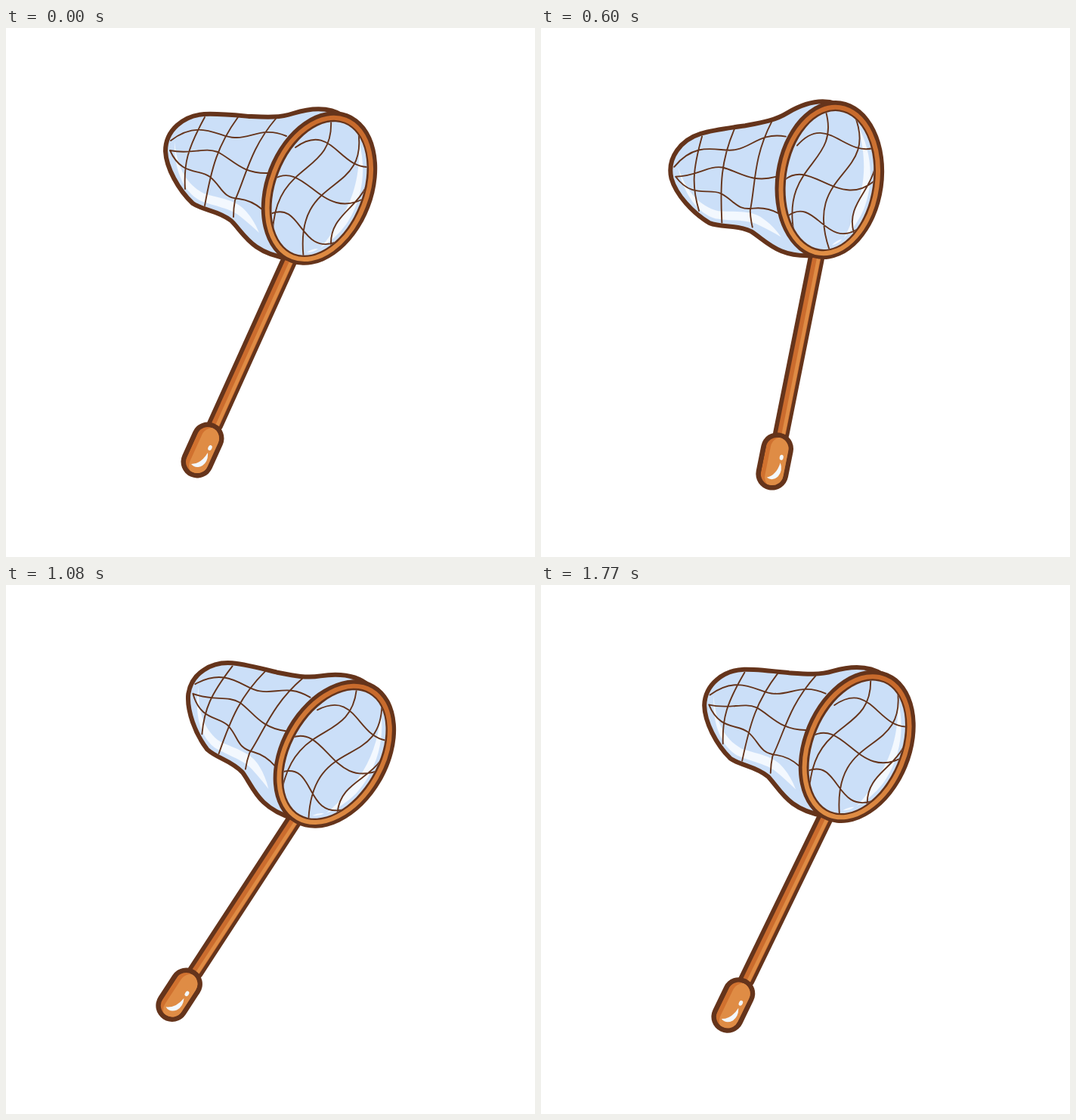
An HTML page that plays this animation: 700 px wide and 700 px high, repeating every 1800 ms.

```html
<!DOCTYPE html>
<html lang="en">
<head>
<meta charset="utf-8">
<title>Butterfly net</title>
<style>
  html, body { margin: 0; height: 100%; overflow: hidden; background: #fff; }
  svg { display: block; width: 100vw; height: 100vh; }
  .line { fill: none; stroke: #65341b; stroke-linecap: round; stroke-linejoin: round; }
  .mesh { stroke-width: 1.9; }
  .shine { fill: #f3f8fe; }
</style>
</head>
<body>
<svg viewBox="0 0 700 700">
  <defs>
    <linearGradient id="wood" x1="0" y1="0" x2="0" y2="1">
      <stop offset="0" stop-color="#c86a2c"/>
      <stop offset="1" stop-color="#e08e45"/>
    </linearGradient>
    <clipPath id="grip"><rect x="-15" y="-32" width="30" height="64" rx="15"/></clipPath>
    <clipPath id="mouth">
      <ellipse rx="57.5" ry="92" transform="translate(414.5 212.5) rotate(21)"/>
    </clipPath>
  </defs>
  <g id="net">
    <!-- pole -->
    <g transform="translate(374.5 308) rotate(24.3)">
      <path class="line" stroke-width="21.5" d="M0 0V238"/>
      <path stroke="#cb6c2e" stroke-width="11" d="M.5 0V238"/>
      <path stroke="#df8c45" stroke-width="4.5" d="M3 0V238"/>
    </g>

    <!-- bag -->
    <path class="line" stroke-width="6" style="fill:#cbdff8" d="M446 116C424 102 396 108 380 113C362 119 345 118 322 117C300 115 280 113 262 114C235 116 211 135 211 163C212 185 228 214 247 232C262 242 280 241 298 255C315 272 325 298 374 305"/>
    <path class="shine" d="M223 150C226 185 240 208 262 219C285 226 305 227 318 243Q328 254 335 271Q322 259 312 251C298 238 275 236 256 228C235 216 222 188 223 150Z"/>
    <path class="line mesh" d="M218 149C258 118 284 147 304 145C325 146 340 130 371 143
      M217 162C245 168 262 157 280 164C300 174 312 193 346 192
      M217 162C232 196 256 186 270 197C286 210 285 224 308 226Q325 228 339 240
      M263 118C240 160 235 180 237 213
      M307 118C280 155 272 185 263 235
      M357 120C323 160 318 195 303 228Q301 238 301 250"/>

    <!-- hoop -->
    <g transform="translate(414.5 212) rotate(21)">
      <ellipse rx="71.5" ry="105.5" fill="#65341b"/>
      <ellipse cy=".5" rx="63.3" ry="97.3" fill="none" stroke="url(#wood)" stroke-width="6"/>
    </g>
    <g clip-path="url(#mouth)">
      <path fill="#cbdff8" d="M330 100h170v220h-170z"/>
      <path class="shine" d="M467 150C477 185 473 226 450 260Q436 279 416 291Q430 275 438 260C460 228 469 195 467 150ZM398 297Q405 292 413 292Q407 297 398 297Z"/>
      <path class="line mesh" d="M383 158C430 124 440 185 480 184
        M354 200C398 174 418 262 480 222
        M350 246C392 228 388 302 438 283
        M430 122C434 195 358 175 353 268
        M466 136C480 225 380 190 394 306
        M476 211C462 240 428 250 430 288"/>
    </g>

    <!-- grip -->
    <g transform="translate(260 558.5) rotate(24.3)">
      <rect x="-21.5" y="-38.5" width="43" height="77" rx="21.5" fill="#65341b"/>
      <g clip-path="url(#grip)">
        <path fill="#d0712f" d="M-15-32h30v64h-30z"/>
        <rect x="-9" y="-34" width="40" height="70" rx="16" fill="#df8c45"/>
      </g>
    </g>
    <path class="shine" d="M245 577Q258 577 267 562Q268 573 260 579Q251 584 245 577Z"/>
    <ellipse class="shine" cx="270" cy="555.5" rx="2.5" ry="3.6" transform="rotate(24 270 555.5)"/>
  </g>
</svg>
<script>
  const LOOP = 1800, STEP = 30, SWING = 15;
  const net = document.getElementById("net");

  function draw() {
    const t = Math.floor(performance.now() % LOOP / STEP) * STEP;
    const angle = -SWING * Math.sin(2 * Math.PI * t / LOOP);
    net.setAttribute("transform", `rotate(${angle} 350 350)`);
    requestAnimationFrame(draw);
  }
  draw();
</script>
</body>
</html>
```
